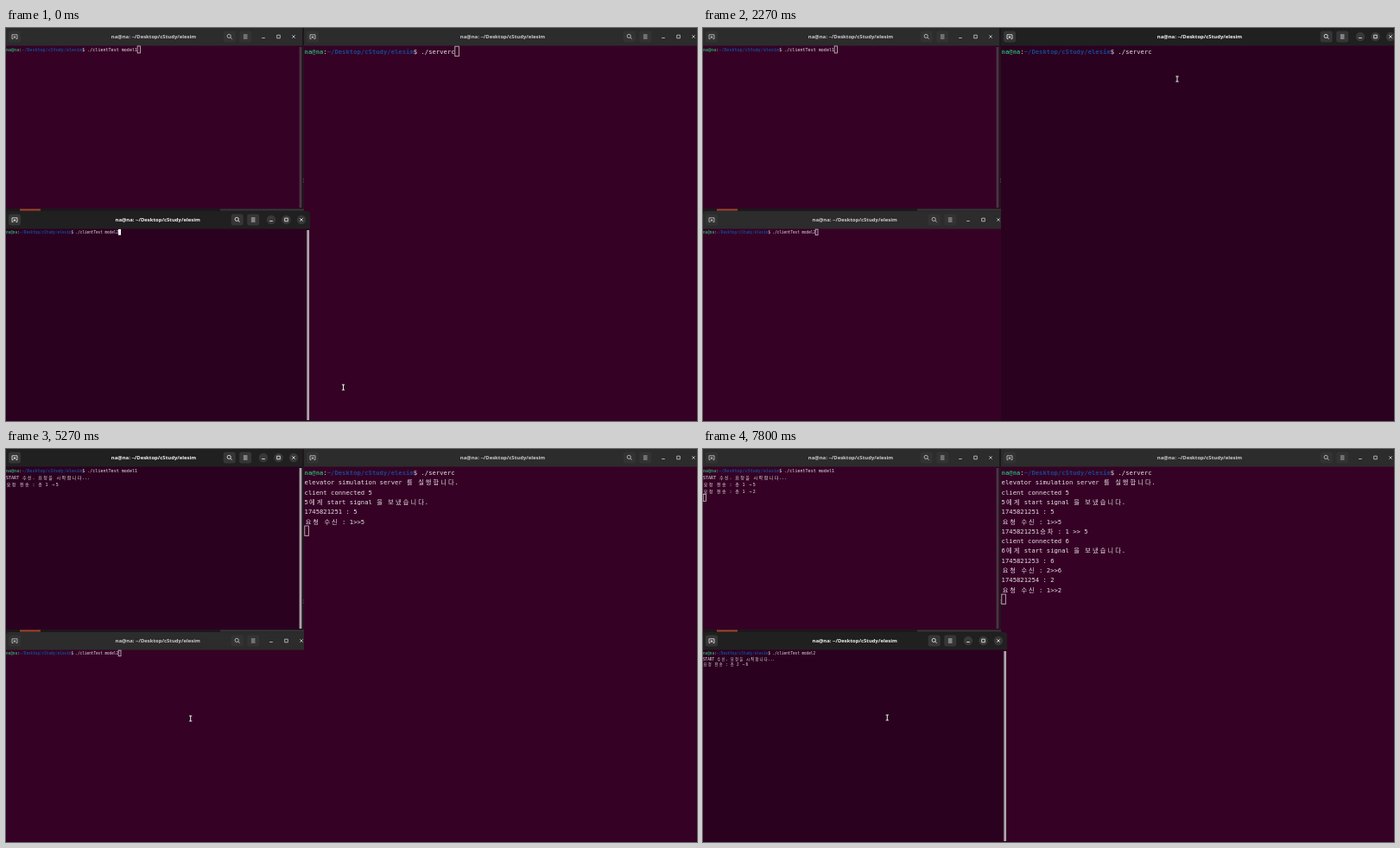
Write an HTML page with a canvas that moves like this. It is 800 by 455 pixels and loops after 8 s.

```html
<!DOCTYPE html>
<html lang="ko">
<head>
<meta charset="utf-8">
<title>Elevator simulation terminals</title>
<style>
  html, body { margin: 0; width: 100%; height: 100%; overflow: hidden; background: #1b171a; }
  canvas { display: block; width: 800px; height: 455px; }
</style>
</head>
<body>
<canvas id="stage" width="800" height="455"></canvas>
<script>
const ctx = document.getElementById('stage').getContext('2d');
const LOOP = 8000, BLINK = 600;
const USER = 'na@na', PATH = '~/Desktop/cStudy/elesim';
const MONO = '"DejaVu Sans Mono", "Noto Sans CJK KR", "Noto Sans CJK", monospace';
const SANS = '"Noto Sans", "Open Sans", sans-serif';

// Output: [time it appears, line, line, ...]
const windows = {
  T: { x: 0, y: 0, w: 343, h: 209, close: 333, title: 171, cell: 3.04, row: 7.85, textX: 0, textY: 20.9,
    command: './clientTest model1', bar: 341, output: [
      [4670, 'START 수신. 요청을 시작합니다...', '요청 전송 : 층 1 →5'],
      [7600, '요청 전송 : 층 1 →2']] },
  B: { x: 0, y: 212, w: 352, h: 243, close: 342, title: 175.7, cell: 2.6, row: 6.45, textX: 0, textY: 233.1,
    command: './clientTest model2', bar: 349.7, output: [
      [6000, 'START 수신. 요청을 시작합니다...', '요청 전송 : 층 2 →6']] },
  R: { x: 345, y: 0, w: 455, h: 455, close: 796, title: 575, cell: 4.35, row: 11.3, textX: 345.6, textY: 21.2,
    command: './serverc', output: [
      [2530, 'elevator simulation server 를 실행합니다.'],
      [4670, 'client connected 5', '5에게 start signal 을 보냈습니다.', '1745821251 : 5', '요청 수신 : 1>>5'],
      [5470, '1745821251승차 : 1 >> 5'],
      [6000, 'client connected 6', '6에게 start signal 을 보냈습니다.', '1745821253 : 6', '요청 수신 : 2>>6'],
      [7600, '1745821254 : 2', '요청 수신 : 1>>2']] }
};

// Stacking order from back to front; the front window has the focus.
const focusChanges = [
  { at: 0, order: 'TRB', fade: [0, 1] },
  { at: 1070, order: 'TBR', fade: [1600, 2130] },
  { at: 3870, order: 'BRT', fade: [4000, 4330] },
  { at: 5800, order: 'RTB', fade: [5870, 6070] }
];
const blinkResets = [0, 1530, 2530, 4000, 4670, 6000];
const pointerPath = [
  [0, 390.5, 416], [200, 390.5, 416], [1000, 566, 56], [1670, 566, 56], [2130, 549, 59],
  [2800, 549, 59], [3130, 530, 69], [3730, 214, 106], [4700, 214, 106],
  [5270, 213.7, 312], [5800, 213.7, 312], [6400, 214.5, 310], [6600, 213.3, 311]
];

const clamp = v => Math.max(0, Math.min(1, v));
const lastBefore = (list, t, time) => list.reduce((found, item) => time(item) <= t ? item : found);
const gray = v => `rgb(${v},${v},${v})`;
const mix = (a, b, k) => a + (b - a) * k;

function rect(x, y, w, h, color) {
  ctx.fillStyle = color;
  ctx.fillRect(x, y, w, h);
}

// Glyphs are laid out at ten times the size so that positions stay fractional.
function text(str, x, y, size, family, color, align = 'left', weight = '') {
  ctx.save();
  ctx.translate(x, y);
  ctx.scale(0.1, 0.1);
  ctx.font = `${weight} ${size * 10}px ${family}`;
  ctx.textAlign = align;
  ctx.fillStyle = color;
  ctx.fillText(str, 0, 0);
  ctx.restore();
}

// Terminal grid: Hangul and arrows take two cells. Returns the next column.
function cells(win, str, col, row, color, weight) {
  const baseline = win.textY + row * win.row + win.row * 0.78;
  for (const ch of str) {
    const span = /[가-힣→]/.test(ch) ? 2 : 1;
    const x = win.textX + (col + span / 2) * win.cell;
    if (ch !== ' ') text(ch, x, baseline, win.cell / 0.602, MONO, color, 'center', weight);
    col += span;
  }
  return col;
}

function drawLines(win, t) {
  let col = cells(win, USER, 0, 0, '#26a269', 'bold');
  col = cells(win, ':', col, 0, '#e6dfe4');
  col = cells(win, PATH, col, 0, '#17488f', 'bold');
  col = cells(win, '$ ' + win.command, col, 0, '#e6dfe4');
  let row = 0;
  for (const [at, ...lines] of win.output) {
    if (at > t) break;
    for (const line of lines) cells(win, line, 0, ++row, '#e6dfe4');
  }
  return row ? { col: 0, row: row + 1 } : { col, row: 0 };
}

function drawCursor(win, pos, focused, t) {
  const x = win.textX + pos.col * win.cell, y = win.textY + pos.row * win.row - 0.2;
  const w = win.cell + 0.4, h = win.row + 0.4;
  if (!focused) {
    ctx.strokeStyle = '#cfc5cc';
    ctx.lineWidth = 0.8;
    ctx.strokeRect(x + 0.2, y + 0.2, w - 0.2, h - 0.2);
  } else if (Math.floor((t - lastBefore(blinkResets, t, v => v)) / BLINK) % 2 === 0) {
    rect(x, y, w, h, '#fff');
  }
}

function drawHeader(win, lit) {
  const cy = win.y + 10, ink = gray(mix(205, 245, lit));
  const back = gray(mix(44, 32, lit)), button = gray(mix(51, 54, lit));
  ctx.fillStyle = back;
  ctx.beginPath();
  ctx.roundRect(win.x, win.y, win.w, 20.5, win.y ? [4, 4, 0, 0] : 0);
  ctx.fill();

  const pad = x => {
    ctx.fillStyle = button;
    ctx.beginPath();
    ctx.roundRect(x - 7, cy - 6.5, 14, 13, 2.5);
    ctx.fill();
  };
  const tab = win.x + 10, search = win.close - 74.3, menu = win.close - 55.8;
  [tab, search, menu].forEach(pad);
  ctx.fillStyle = gray(mix(44, 56, lit));
  for (const dx of [0, 17.5, 35]) {
    ctx.beginPath();
    ctx.arc(win.close - dx, cy, 5.2, 0, 7);
    ctx.fill();
  }

  ctx.strokeStyle = ink;
  ctx.lineWidth = 0.8;
  ctx.beginPath();
  // new tab
  ctx.moveTo(tab - 1.5, cy + 2.5); ctx.lineTo(tab - 3, cy + 2.5); ctx.lineTo(tab - 3, cy - 2.2);
  ctx.lineTo(tab + 3, cy - 2.2); ctx.lineTo(tab + 3, cy + 2.5); ctx.lineTo(tab + 1.5, cy + 2.5);
  ctx.moveTo(tab - 1.5, cy + 0.6); ctx.lineTo(tab + 1.5, cy + 0.6);
  ctx.moveTo(tab, cy - 0.9); ctx.lineTo(tab, cy + 2.1);
  // search
  ctx.moveTo(search + 1.6, cy - 0.6);
  ctx.arc(search - 0.5, cy - 0.6, 2.1, 0, 7);
  ctx.moveTo(search + 1, cy + 0.9); ctx.lineTo(search + 2.9, cy + 2.8);
  // menu
  for (const dy of [-2, 0, 2]) { ctx.moveTo(menu - 2.3, cy + dy); ctx.lineTo(menu + 2.3, cy + dy); }
  // minimise, maximise, close
  ctx.moveTo(win.close - 36.8, cy + 1.5); ctx.lineTo(win.close - 33.2, cy + 1.5);
  ctx.rect(win.close - 19.3, cy - 1.8, 3.6, 3.6);
  ctx.moveTo(win.close - 1.7, cy - 1.7); ctx.lineTo(win.close + 1.7, cy + 1.7);
  ctx.moveTo(win.close + 1.7, cy - 1.7); ctx.lineTo(win.close - 1.7, cy + 1.7);
  ctx.stroke();

  text(`${USER}: ${PATH}`, win.title, cy + 2.1, 5.95, SANS, ink, 'center', 'bold');
}

function drawWindow(win, focused, lit, t) {
  ctx.save();
  ctx.beginPath();
  ctx.rect(win.x, win.y, win.w, win.h);
  ctx.clip();
  rect(win.x, win.y + 20, win.w, win.h - 20, focused ? '#2b0120' : '#350225');
  drawHeader(win, lit);
  if (win.bar) {
    rect(win.bar - 1.4, win.y + 22, 2.8, win.h - 23, focused ? '#aca5aa' : '#4b3545');
  }
  drawCursor(win, drawLines(win, t), focused, t);
  ctx.restore();
}

function drawBackdrop() {
  rect(0, 0, 800, 455, '#1d171b');
  rect(16, 209.5, 24, 2, '#a5432f');
  rect(248, 209.5, 97, 2, '#393638');
}

function drawPointer(t) {
  const i = pointerPath.findIndex(p => p[0] > t);
  const b = pointerPath.at(i), a = i > 0 ? pointerPath[i - 1] : b;
  const p = a === b ? 1 : clamp((t - a[0]) / (b[0] - a[0]));
  const k = p * p * (3 - 2 * p);
  const x = mix(a[1], b[1], k), y = mix(a[2], b[2], k);
  for (const [color, width] of [['#120a10', 2.2], ['#f4f0f2', 1]]) {
    ctx.strokeStyle = color;
    ctx.lineWidth = width;
    ctx.beginPath();
    ctx.moveTo(x, y - 3); ctx.lineTo(x, y + 3);
    for (const dy of [-3, 3]) { ctx.moveTo(x - 1.6, y + dy); ctx.lineTo(x + 1.6, y + dy); }
    ctx.stroke();
  }
}

function draw(t) {
  const change = lastBefore(focusChanges, t, c => c.at);
  const previous = focusChanges[focusChanges.indexOf(change) - 1];
  const front = change.order[2], loser = previous && previous.order[2];
  const [from, to] = change.fade;
  drawBackdrop();
  for (const id of change.order) {
    const lit = id === front ? 1 : id === loser ? 1 - clamp((t - from) / (to - from)) : 0;
    drawWindow(windows[id], id === front, lit, t);
  }
  rect(344, 174.5, 0.8, 1, '#77686f');
  rect(344, 177.5, 0.8, 1, '#77686f');
  drawPointer(t);
}

const start = performance.now();
function frame() {
  draw((performance.now() - start) % LOOP);
  requestAnimationFrame(frame);
}
frame();
</script>
</body>
</html>
```
